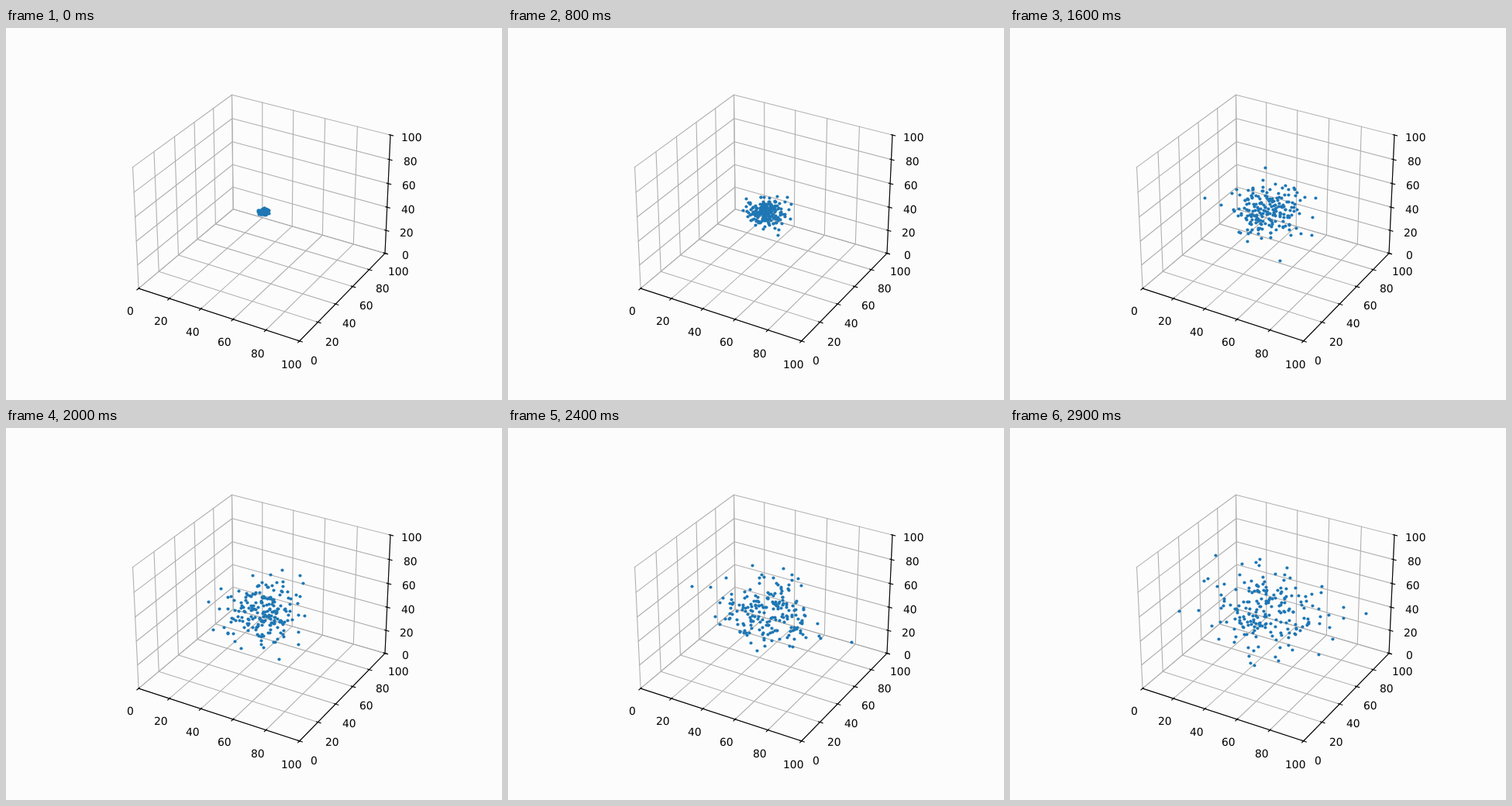
An HTML page with a canvas for the animation above (3 s loop, 640 px wide and 480 px high).

```html
<!DOCTYPE html>
<html lang="en">
<head>
<meta charset="utf-8">
<title>Spreading point cloud</title>
<style>
  html, body { margin: 0; width: 100%; height: 100%; overflow: hidden; background: #fcfcfc; }
  canvas { display: block; }
</style>
</head>
<body>
<canvas id="stage" width="640" height="480"></canvas>
<script>
const ctx = document.getElementById('stage').getContext('2d');

const STEP_MS = 100, STEPS = 30, POINTS = 200;
const TICKS = [0, 20, 40, 60, 80, 100];
const TICK_OUT = 1.67, TICK_IN = 0.83;
const LABEL_GAP = 8.64, LABEL_DROP = 11;
const LINE_WIDTH = 1.11;

// Perspective view of the 0..100 cube: elevation 30°, azimuth -60°, distance 10.
const SIDE = 1.1905, HEIGHT = 0.8929, DISTANCE = 10, SCALE = 1997.8;
const COS30 = Math.sqrt(3) / 2;

function project([px, py, pz]) {
  const x = (px / 100 - 0.5) * SIDE;
  const y = (py / 100 - 0.5) * SIDE;
  const z = (pz / 100 - 0.5) * HEIGHT;
  const right = COS30 * x + 0.5 * y;
  const up = -0.25 * x + COS30 / 2 * y + COS30 * z;
  const toward = COS30 / 2 * x - 0.75 * y + 0.5 * z;
  const k = SCALE / (DISTANCE - toward);
  return [333 + right * k, 237.4 - up * k];
}

function polyline(color, ...points) {
  ctx.strokeStyle = color;
  ctx.beginPath();
  points.forEach(p => ctx.lineTo(...project(p)));
  ctx.stroke();
}

function label(value, position) {
  const [x, y] = project(position);
  const text = String(value);
  const left = Math.round(x - ctx.measureText(text).width / 2);
  ctx.fillText(text, left, Math.round(y + LABEL_DROP));
}

function drawAxes() {
  ctx.lineWidth = LINE_WIDTH;
  ctx.lineJoin = 'round';
  ctx.lineCap = 'square';

  const grid = '#b0b0b0';
  for (const t of TICKS) {
    polyline(grid, [t, 0, 0], [t, 100, 0], [t, 100, 100]);
    polyline(grid, [100, t, 0], [0, t, 0], [0, t, 100]);
    polyline(grid, [100, 100, t], [0, 100, t], [0, 0, t]);
  }

  const ink = '#000';
  polyline(ink, [0, 0, 0], [100, 0, 0]);
  polyline(ink, [100, 0, 0], [100, 100, 0]);
  polyline(ink, [100, 100, 0], [100, 100, 100]);

  ctx.fillStyle = ink;
  ctx.font = '13.89px "DejaVu Sans", sans-serif';
  ctx.textRendering = 'geometricPrecision';
  const far = 100 + LABEL_GAP, near = -LABEL_GAP;
  for (const t of TICKS) {
    polyline(ink, [t, -TICK_OUT, 0], [t, TICK_IN, 0]);
    polyline(ink, [100 + TICK_OUT, t, 0], [100 - TICK_IN, t, 0]);
    polyline(ink, [100 + TICK_OUT, 100, t], [100 - TICK_IN, 100, t]);
    label(t, [t, near, near]);
    label(t, [far, t, near]);
    label(t, [far, far, t]);
  }
}

function randomFrom(seed) {
  return () => {
    seed = (seed + 0x6D2B79F5) | 0;
    let v = Math.imul(seed ^ (seed >>> 15), 1 | seed);
    v = (v + Math.imul(v ^ (v >>> 7), 61 | v)) ^ v;
    return ((v ^ (v >>> 14)) >>> 0) / 4294967296;
  };
}

// Every step is a fresh normal sample whose spread grows linearly.
function drawCloud(step) {
  const random = randomFrom(1000 + step * 7919);
  const normal = () =>
    Math.sqrt(-2 * Math.log(1 - random())) * Math.cos(2 * Math.PI * random());
  const spread = 1 + step / 2;
  const coordinate = () => 50 + spread * normal();

  ctx.fillStyle = '#1f77b4';
  for (let i = 0; i < POINTS; i++) {
    const [x, y] = project([coordinate(), coordinate(), coordinate()]);
    ctx.beginPath();
    ctx.arc(Math.floor(x) + 0.5, Math.floor(y) + 0.5, 2.08, 0, 2 * Math.PI);
    ctx.fill();
  }
}

function draw(step) {
  ctx.fillStyle = '#fcfcfc';
  ctx.fillRect(0, 0, 640, 480);
  drawAxes();
  drawCloud(step);
}

const start = performance.now();
let shown = -1;

function tick() {
  const step = Math.floor((performance.now() - start) / STEP_MS) % STEPS;
  if (step !== shown) draw(shown = step);
  requestAnimationFrame(tick);
}
tick();
</script>
</body>
</html>
```
